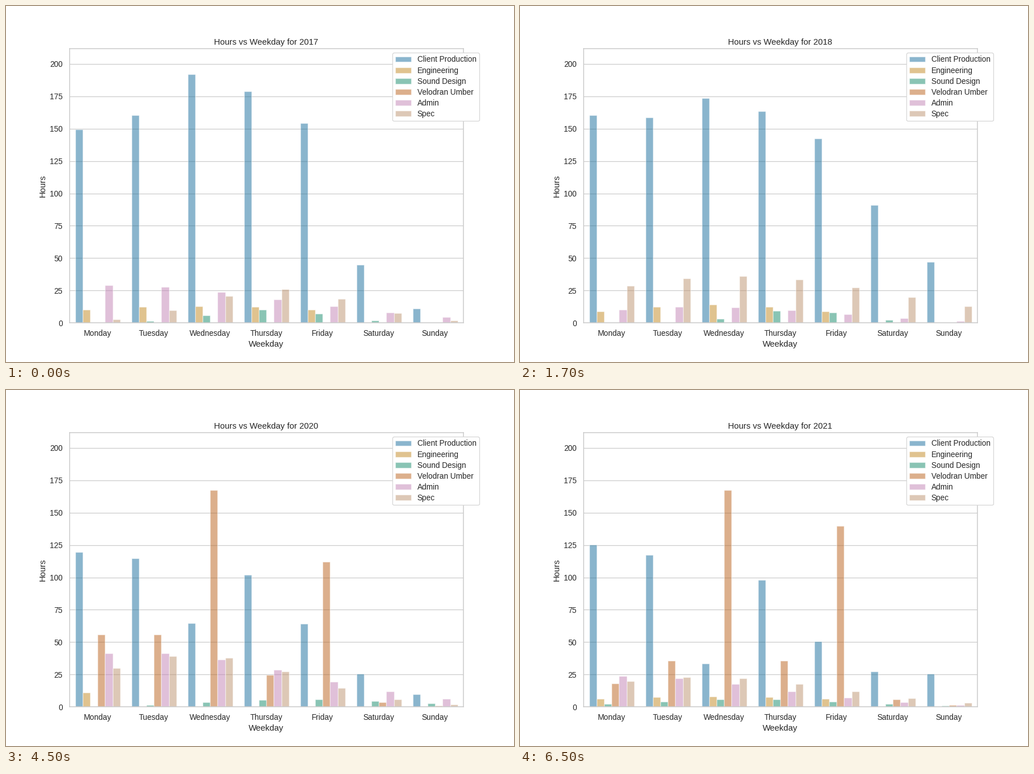
A matplotlib script that plays this animation: 894x626 px, repeating every 8000 ms.

```python
import colorsys

import matplotlib.pyplot as plt
import numpy as np
from matplotlib.animation import FuncAnimation
from matplotlib.colors import to_rgb

WIDTH, HEIGHT, DPI = 894, 626, 89.4
STEP_MS, STEPS = 500, 16
FIRST_YEAR = 2017

DAYS = ["Monday", "Tuesday", "Wednesday", "Thursday", "Friday", "Saturday", "Sunday"]
WEDNESDAY, FRIDAY = 2, 4
COLORS = {
    "Client Production": "#0173b2",
    "Engineering": "#de8f05",
    "Sound Design": "#029e73",
    "Velodran Umber": "#d55e00",
    "Admin": "#cc78bc",
    "Spec": "#ca9161",
}
days = np.arange(len(DAYS))

# Client work by weekday, one row per year.
CLIENT_WEEKS = [
    (149.5, 160.5, 192, 179, 154.5, 45, 11),
    (160.5, 158.5, 173.5, 163.3, 142.5, 91, 47),
    (120.5, 117.3, 105.4, 116, 123.2, 48.8, 30.3),
    (119.7, 114.6, 64.7, 102, 64.2, 25.7, 9.6),
    (125.2, 117.3, 33.5, 98, 50.4, 27.2, 25.6),
]

# Yearly humps over the week: peak hours, peak day, spread in days.
HUMPS = {
    "Engineering": [(13, 2, 4), (14, 2, 3), (8, 3.2, 2.2), (11, 0, 0.5), (8, 2, 4)],
    "Sound Design": [(10, 3.1, 1.5), (10, 3.4, 1.3), (9, 4, 3), (6, 3.8, 2.4),
                     (6, 2.5, 2.5)],
    "Velodran Umber": [(0, 0, 1), (0, 0, 1), (50, 0.8, 5), (58, 0.5, 2.7),
                       (45, 2, 2.1)],
    "Admin": [(29, 0, 4.4), (12.5, 1.4, 3.2), (14, 1.5, 3), (42, 0.5, 4),
              (24, 0, 3.6)],
    "Spec": [(26, 2.9, 1.9), (36, 1.9, 4), (26, 1.3, 2.7), (40, 1.4, 2.6),
             (23, 1.3, 3.3)],
}

plt.rcParams.update({
    "font.family": "Liberation Sans",
    "text.color": "0.15",
    "axes.labelcolor": "0.15",
    "axes.edgecolor": "0.8",
    "axes.linewidth": 1.25,
    "axes.axisbelow": True,
    "axes.titlesize": 12,
    "axes.labelsize": 12,
    "grid.color": "0.8",
    "grid.linewidth": 1,
    "legend.fontsize": 11,
})


def desaturate(color, amount=0.75):
    hue, light, sat = colorsys.rgb_to_hls(*to_rgb(color))
    return colorsys.hls_to_rgb(hue, light, sat * amount)


def weekly_hours(name, year):
    index = year - FIRST_YEAR
    if name == "Client Production":
        return np.array(CLIENT_WEEKS[index])
    peak, day, spread = HUMPS[name][index]
    hours = peak * np.exp(-((days - day) / spread) ** 2)
    if name == "Engineering":
        hours[days > FRIDAY] = 0
    if name == "Velodran Umber" and year >= 2020:
        # Two weekdays become reserved for this project.
        hours[WEDNESDAY] = 167.5
        hours[FRIDAY] = 112 + 28 * (year - 2020)
    return np.where(hours < 0.8, 0, hours)


# The small surplus keeps the pixel size from being floored down.
fig = plt.figure(figsize=((WIDTH + 0.01) / DPI, (HEIGHT + 0.01) / DPI),
                 dpi=DPI, facecolor="white")
ax = fig.add_axes([0.125, 0.11, 0.775, 0.77])

bar_width = 0.8 / len(COLORS)
groups = {
    name: ax.bar(days - 0.4 + (i + 0.5) * bar_width, np.ones(len(DAYS)), bar_width,
                 color=desaturate(color), edgecolor="white", linewidth=1,
                 alpha=0.5, label=name)
    for i, (name, color) in enumerate(COLORS.items())
}

ax.set_xlim(-0.5, 6.5)
ax.set_ylim(0, 211.8)
ax.set_xticks(days, DAYS)
ax.set_yticks(np.arange(0, 201, 25))
ax.tick_params(length=0, pad=9.5, labelsize=11, labelcolor="0.15")
ax.grid(axis="y")
ax.set_xlabel("Weekday")
ax.set_ylabel("Hours")
title = ax.set_title("")
ax.legend(loc="upper right", bbox_to_anchor=(1.051, 1), labelspacing=0.375,
          framealpha=1, edgecolor="0.84")


def update(step):
    year = FIRST_YEAR + (step + 3) // 4
    title.set_text(f"Hours vs Weekday for {year}")
    for name, bars in groups.items():
        for bar, value in zip(bars, weekly_hours(name, year)):
            bar.set_height(value)
            bar.set_visible(value > 0)
    return [title, *(bar for bars in groups.values() for bar in bars)]


update(0)
anim = FuncAnimation(fig, update, frames=STEPS, interval=STEP_MS,
                     repeat=True, repeat_delay=0, blit=False)
plt.show()
```
